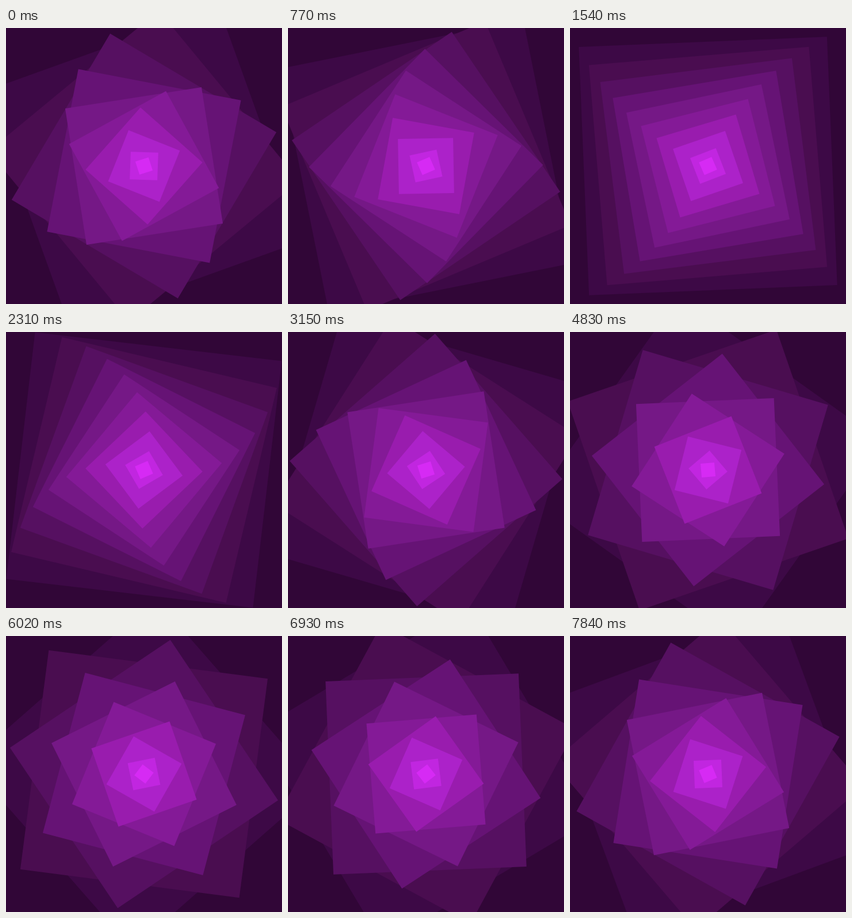
These frames come from a looping animation (480 by 480 pixels, 7.91 s). An HTML page:

```html
<!DOCTYPE html>
<html lang="en">
<head>
<meta charset="utf-8">
<title>Turning squares</title>
<style>
  html, body { margin: 0; width: 100%; height: 100%; overflow: hidden; background: #310637; }
  svg { display: block; width: 100vw; height: 100vh; }
</style>
</head>
<body>
<svg id="stage" viewBox="-240 -240 480 480"></svg>
<script>
const LOOP = 7910, TICK = 70, UNIT = 48;

// Outermost square first
const colors = ['#310637', '#3d0946', '#4a0d50', '#561061', '#661375', '#751886',
                '#841a97', '#991cae', '#ac22c9', '#c126e0', '#d62af4'];

// [time in ms, twist in degrees between neighbouring squares]
const twists = [[0, -19.78], [770, -11.38], [2310, 6.65], [3990, 25.87],
                [4830, 35.5], [6020, 48.7], [7840, 69.73], [LOOP, 70.22]];

const stage = document.getElementById('stage');
const squares = colors.map((fill, i) => {
  const side = UNIT * (10 - i) || UNIT / 2;
  const size = i === 0 ? 480 : UNIT * (10 - i) + (i === 10 ? side : 0);
  const rect = document.createElementNS('http://www.w3.org/2000/svg', 'rect');
  const attrs = { x: -size / 2, y: -size / 2, width: size, height: size, fill };
  for (const name in attrs) rect.setAttribute(name, attrs[name]);
  return stage.appendChild(rect);
});

function twistAt(time) {
  const next = twists.findIndex(([t]) => t > time);
  const [t0, a0] = twists[next - 1], [t1, a1] = twists[next];
  return a0 + (a1 - a0) * (time - t0) / (t1 - t0);
}

function draw() {
  const time = Math.floor(performance.now() % LOOP / TICK) * TICK;
  const twist = twistAt(time);
  squares.forEach((rect, i) => rect.setAttribute('transform', `rotate(${i * twist})`));
  requestAnimationFrame(draw);
}
draw();
</script>
</body>
</html>
```
